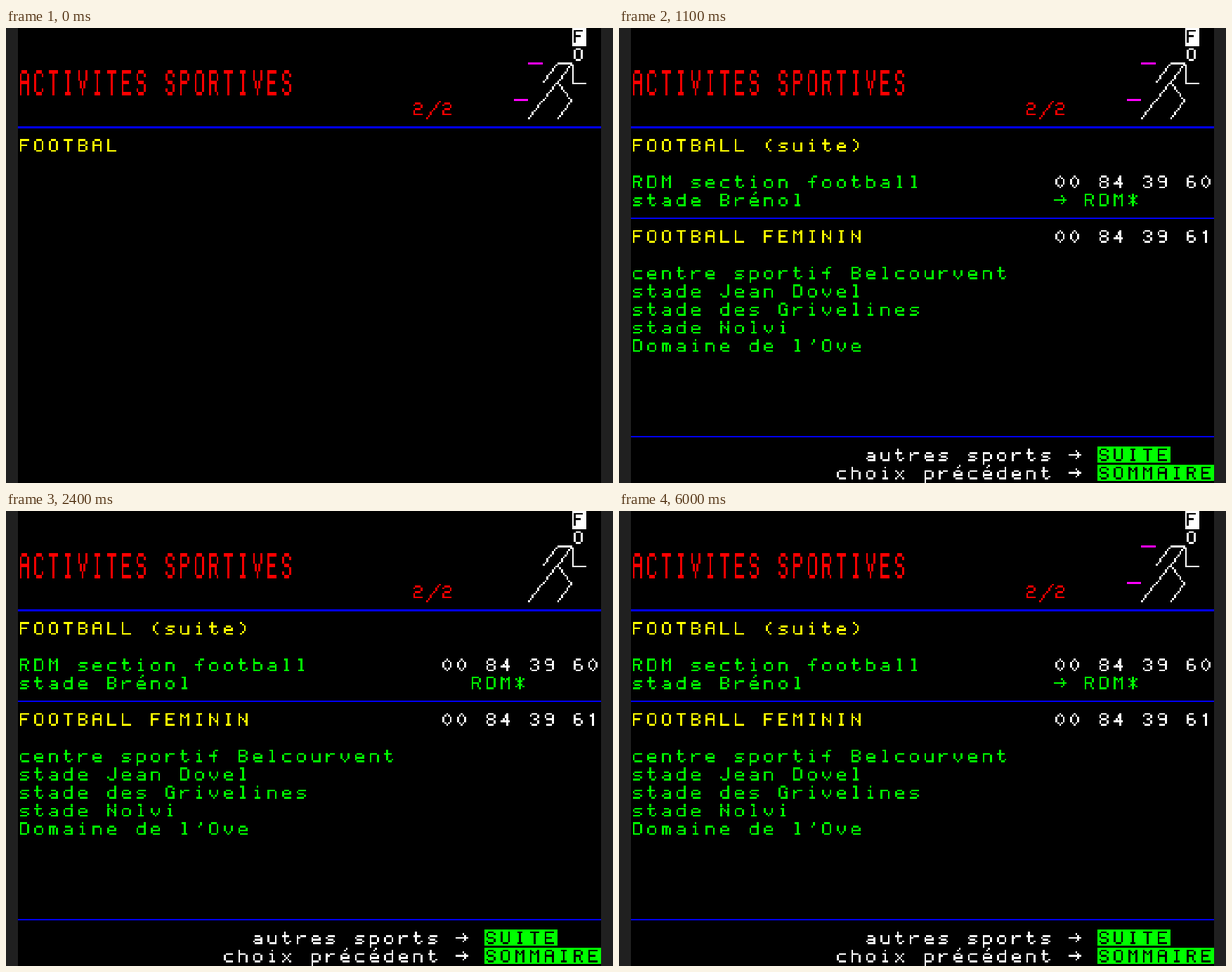
Write an HTML page that moves like this. It is 864 px wide and 648 px high and loops after 8 s.

```html
<!DOCTYPE html>
<html lang="fr">
<head>
<meta charset="utf-8">
<title>Activités sportives</title>
<style>
  html, body { margin: 0; width: 100%; height: 100%; overflow: hidden; background: #000; }
  svg { display: block; width: 100vw; height: 100vh; }
  path, rect { shape-rendering: crispEdges; }
  text {
    font: 24px "Liberation Mono", monospace;
    letter-spacing: 6.35px;
    white-space: pre;
    fill: transparent;
  }
</style>
</head>
<body>
<svg id="screen" viewBox="0 0 864 648">
  <rect width="864" height="648" fill="#000"/>
  <rect width="17" height="648" fill="#202020"/>
  <rect x="847" width="17" height="648" fill="#202020"/>
  <g id="header"></g>
  <g id="typed"></g>
  <g id="page"></g>
  <g id="blinkHeader"></g>
  <g id="blinkPage"></g>
</svg>
<script>
const NS = 'http://www.w3.org/2000/svg';
const LEFT = 17, CW = 830 / 40, CH = 648 / 25;
const PX = CW / 8, PY = CH / 10;
const RED = '#f00', GREEN = '#0f0', BLUE = '#00f', YELLOW = '#ff0', WHITE = '#fff', MAGENTA = '#f0f', BLACK = '#000';
const LOOP = 8000;

// Pen strokes on an 8 x 10 cell: each point is column, row; "|" lifts the pen.
const pen = {
  A: '17 12 21 41 52 57|14 54',
  B: '11 17 47 56 55 44 14|11 41 52 53 44',
  C: '52 41 21 12 16 27 47 56',
  D: '11 17 47 56 52 41 11',
  E: '51 11 17 57|14 44',
  F: '51 11 17|14 44',
  G: '52 41 21 12 16 27 57 54 44',
  I: '21 41|31 37|27 47',
  J: '51 56 47 27 16',
  L: '11 17 57',
  M: '17 11 33 51 57',
  N: '17 11|12 56|57 51',
  O: '21 41 52 56 47 27 16 12 21',
  P: '17 11 41 52 53 44 14',
  S: '52 41 21 12 13 24 44 55 56 47 27 16',
  T: '11 51|31 37',
  U: '11 16 27 47 56 51',
  V: '11 13 24 25 36 37 36 45 44 53 51',
  a: '23 43 54 57|55 25 16 27 57',
  b: '11 17 47 56 54 43 13',
  c: '53 23 14 16 27 57',
  d: '51 57 27 16 14 23 53',
  e: '57 27 16 14 23 43 54 55 15',
  f: '51 41 32 37|14 44',
  h: '11 17|13 43 54 57',
  i: '31|23 33 37|27 47',
  l: '21 31 37|27 47',
  n: '17 13 43 54 57',
  o: '23 43 54 56 47 27 16 14 23',
  p: '19 13 43 54 56 47 17',
  r: '13 17|15 33 53',
  s: '53 23 14 25 45 56 47 17',
  t: '21 26 37 47 56|13 43',
  u: '13 16 27 57 53',
  v: '13 15 37 55 53',
  x: '13 57|53 17',
  0: '31 13 15 37 55 53 31',
  1: '22 31 37',
  2: '12 21 41 52 53 44 24 15 17 57',
  3: '12 21 41 52 53 44 34|44 55 56 47 27 16',
  4: '47 41 15 55',
  6: '41 21 12 16 27 47 56 55 44 14',
  8: '21 41 52 53 44 24 13 12 21|24 15 16 27 47 56 55 44',
  9: '54 24 13 12 21 41 52 56 47 27',
  '/': '70 09',
  '\\': '00 79',
  '(': '41 23 25 47',
  ')': '21 43 45 27',
  '*': '31 37|12 56|52 16',
  "'": '41 42 33',
  '→': '04 64|42 64 46'
};
pen.R = pen.P + '|34 57';
pen.m = pen.n + '|33 37';
pen['é'] = pen.e + '|40 31';

const $ = id => document.getElementById(id);
const colX = col => LEFT + col * CW;
const rowY = row => row * CH;

function add(parent, tag, attrs) {
  const el = document.createElementNS(NS, tag);
  for (const key in attrs) el.setAttribute(key, attrs[key]);
  return parent.appendChild(el);
}

function dots(ch) {
  const found = new Set();
  for (const stroke of (pen[ch] || '').split('|')) {
    const pts = stroke.split(' ').filter(Boolean).map(p => [+p[0], +p[1]]);
    pts.forEach(([x, y], i) => {
      const [x0, y0] = pts[Math.max(0, i - 1)];
      const n = Math.max(Math.abs(x - x0), Math.abs(y - y0), 1);
      for (let k = 0; k <= n; k++) {
        found.add(Math.round(x0 + (x - x0) * k / n) + ',' + Math.round(y0 + (y - y0) * k / n));
      }
    });
  }
  return [...found].map(d => d.split(',').map(Number));
}

function glyphs(g, col, row, str, fill, tall = 1) {
  const h = PY * tall, top = rowY(row) + (tall - 1) * PY;
  let d = '';
  [...str].forEach((ch, i) => {
    for (const [x, y] of dots(ch)) {
      const px = colX(col + i) + x * PX, py = top + y * h;
      d += `M${px.toFixed(2)} ${py.toFixed(2)}h${PX.toFixed(3)}v${h.toFixed(3)}h${-PX.toFixed(3)}z`;
    }
  });
  add(g, 'path', { d, fill });
}

// Dot-matrix lettering under a selectable text layer.
function write(g, col, row, str, fill, tall = 1) {
  glyphs(g, col, row, str, fill, tall);
  add(g, 'text', { x: colX(col) + 2, y: rowY(row + tall - 1) + 8 * PY }).textContent = str;
}

function bar(g, col, row, line, cells, fill) {
  add(g, 'rect', { x: colX(col), y: rowY(row) + line * PY, width: cells * CW, height: PY, fill });
}

function label(g, col, row, str, fill, lines) {
  add(g, 'rect', { x: colX(col), y: rowY(row), width: str.length * CW, height: lines * PY, fill });
  write(g, col, row, str, BLACK);
}

function drawHeader(g) {
  write(g, 0, 2, 'ACTIVITES SPORTIVES', RED, 2);
  write(g, 27, 4, '2/2', RED);
  bar(g, 0, 5, 4, 40, BLUE);
  label(g, 38, 0, 'F', WHITE, 10);
  // runner
  glyphs(g, 38, 1, 'O', WHITE);
  bar(g, 37, 1, 9, 1, WHITE);
  add(g, 'rect', { x: colX(38), y: rowY(2), width: PX, height: CH, fill: WHITE });
  bar(g, 38, 3, 0, 1, WHITE);
  glyphs(g, 36, 2, '//', WHITE);
  glyphs(g, 36, 3, '/\\', WHITE);
  glyphs(g, 35, 4, '/', WHITE);
  glyphs(g, 37, 4, '/', WHITE);
}

function drawPage(g) {
  write(g, 0, 6, 'FOOTBALL (suite)', YELLOW);
  write(g, 0, 8, 'RDM section football', GREEN);
  write(g, 29, 8, '00 84 39 60', WHITE);
  write(g, 0, 9, 'stade Brénol', GREEN);
  write(g, 31, 9, 'RDM*', GREEN);
  bar(g, 0, 10, 4, 40, BLUE);
  write(g, 0, 11, 'FOOTBALL FEMININ', YELLOW);
  write(g, 29, 11, '00 84 39 61', WHITE);
  [
    'centre sportif Belcourvent',
    'stade Jean Dovel',
    'stade des Grivelines',
    'stade Nolvi',
    "Domaine de l'Ove"
  ].forEach((str, i) => write(g, 0, 13 + i, str, GREEN));
  bar(g, 0, 22, 4, 40, BLUE);
  write(g, 16, 23, 'autres sports →', WHITE);
  label(g, 32, 23, 'SUITE', GREEN, 9);
  write(g, 14, 24, 'choix précédent →', WHITE);
  label(g, 32, 24, 'SOMMAIRE', GREEN, 9);
}

drawHeader($('header'));
write($('typed'), 0, 6, 'FOOTBAL', YELLOW);
drawPage($('page'));
bar($('blinkHeader'), 35, 1, 9, 1, MAGENTA);
bar($('blinkHeader'), 34, 3, 9, 1, MAGENTA);
write($('blinkPage'), 29, 9, '→', GREEN);

function show(id, on) {
  $(id).style.display = on ? '' : 'none';
}

function render(t) {
  const loaded = t >= 500;
  const lit = t < 1500 || t >= 3000;
  show('typed', !loaded);
  show('page', loaded);
  show('blinkHeader', lit);
  show('blinkPage', loaded && lit);
}

const start = performance.now();
function tick() {
  render((performance.now() - start) % LOOP);
  requestAnimationFrame(tick);
}
tick();
</script>
</body>
</html>
```
